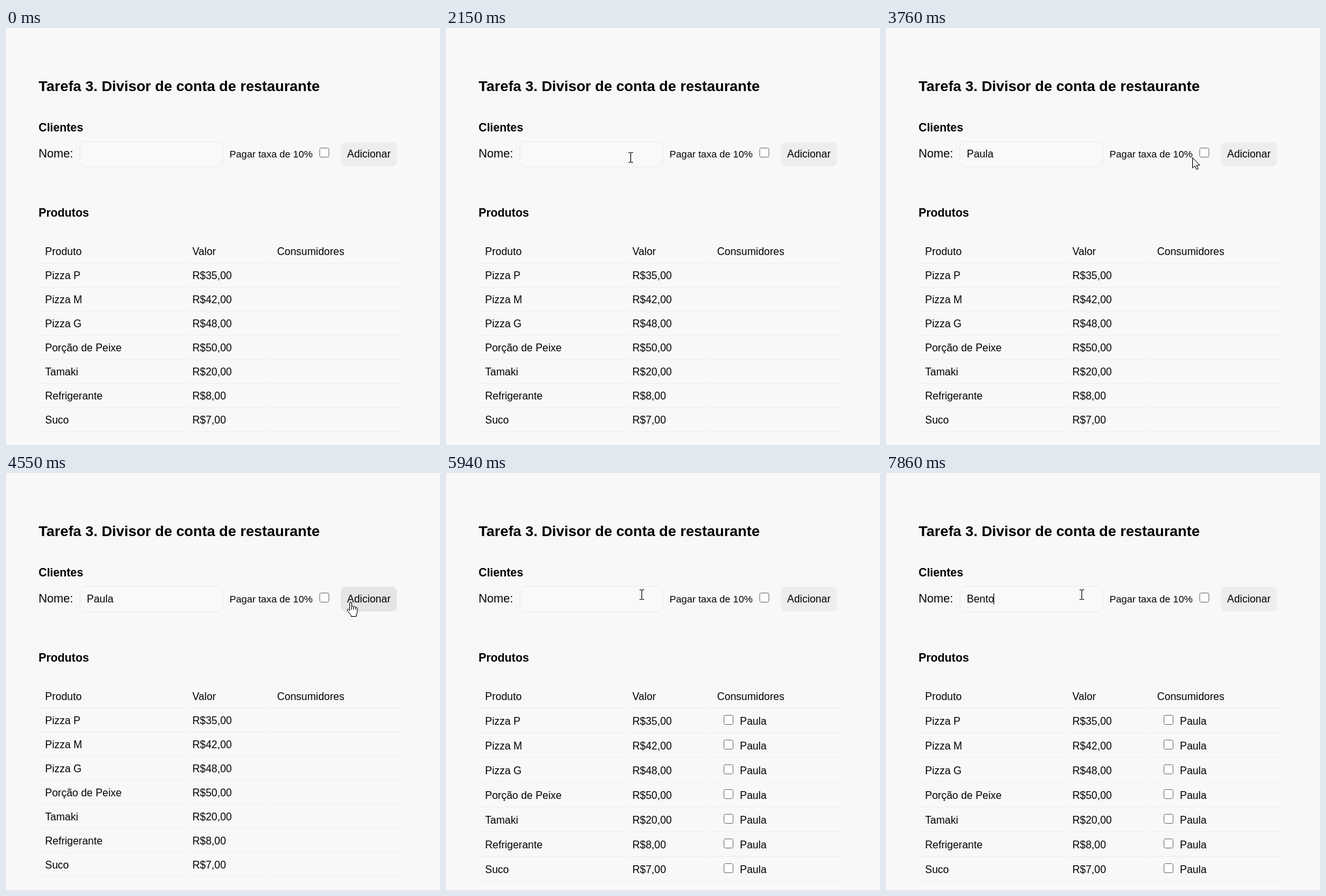
An HTML page that plays this animation: 666 by 641 pixels, repeating every 8 s.

```html
<!DOCTYPE html>
<html lang="pt-BR">
<head>
<meta charset="utf-8">
<title>Divisor de conta</title>
<style>
  html, body { margin: 0; width: 100%; height: 100%; overflow: hidden; background: #f8f8f8; }
  svg { display: block; width: 666px; height: 641px; }
  text { font: 16px "Liberation Sans", Arial, sans-serif; white-space: pre; }
  .title { font-size: 22.4px; font-weight: bold; }
  .head { font-size: 17.6px; font-weight: bold; }
  .name { font-size: 18px; }
  .fee { font-size: 15px; }
  .line { fill: #eee; }
  .field { fill: #f9f9f9; stroke: #eaeaea; }
  .box { fill: #fff; stroke: #767676; }
  .hover .box { stroke: #4f4f4f; }
  .tick { fill: none; stroke: #fff; stroke-width: 2; visibility: hidden; }
  .checked .box { fill: #0075ff; stroke: #0075ff; }
  .checked.hover .box { fill: #005cc8; stroke: #005cc8; }
  .checked .tick { visibility: visible; }
  #button { fill: #ededed; }
  #button.hover { fill: #e5e5e5; }
  .pointer { fill: #fff; stroke: #000; stroke-linejoin: round; }
  #beam { fill: none; stroke: #000; }
</style>
</head>
<body>
<svg viewBox="0 0 666 641">
  <defs>
    <g id="checkbox">
      <rect class="box" x=".5" y=".5" width="14" height="14" rx="2.2"/>
      <path class="tick" d="M3.2 7.6 6.2 10.6 12 4.2"/>
    </g>
  </defs>

  <text class="title" x="50" y="97">Tarefa 3. Divisor de conta de restaurante</text>
  <text class="head" x="50" y="159">Clientes</text>
  <text class="name" x="50" y="199">Nome:</text>
  <rect class="field" x="113.5" y="174.5" width="219" height="39" rx="7.5"/>
  <text id="typed" x="124" y="199"></text>
  <rect id="caret" width="1" height="17"/>
  <text class="fee" x="343" y="199">Pagar taxa de 10%</text>
  <g id="fee"><use href="#checkbox" x="481" y="184"/></g>
  <rect id="button" x="514" y="175" width="86" height="38" rx="8"/>
  <text x="523.5" y="199">Adicionar</text>

  <text class="head" x="50" y="290">Produtos</text>
  <g id="table"></g>

  <g id="cursor">
    <path id="arrow" class="pointer" d="M.5 .5V16.2L4.1 12.8 6.5 18.4 9 17.4 6.6 11.9H11.5Z"/>
    <path id="hand" class="pointer" d="M.5 13.5V2Q.5 .5 2 .5T3.5 2V7.5Q4 6.4 5.2 6.6T6.5 8Q7 7.1 8.2 7.4T9.5 9Q10 8.3 11 8.6T12.2 10.2V15Q12 18 10.5 20V22.5H2.5V20.5Q-.5 17.5-2.6 14.2-4 12-2.8 11.2-1.6 10.8 .5 13.5M3.5 7.5V12M6.5 8V12M9.5 9V12"/>
    <path id="beam" d="M-3-7.5H-1Q.5-7.5 .5-6V6Q.5 7.5-1 7.5H-3M4-7.5H2Q.5-7.5 .5-6V6Q.5 7.5 2 7.5H4"/>
  </g>
</svg>

<script>
const LOOP = 8000;
const ADDED = 4680;
const CLIENT = "Paula";
const $ = id => document.getElementById(id);

const products = [
  ["Pizza P", "35,00"], ["Pizza M", "42,00"], ["Pizza G", "48,00"],
  ["Porção de Peixe", "50,00"], ["Tamaki", "20,00"],
  ["Refrigerante", "8,00"], ["Suco", "7,00"]
];

const rule = (x, w) => `<rect class="line" x="${x}" y="12" width="${w}" height="1"/>`;
const rules = rule(52, 223) + rule(278, 128) + rule(408, 200);
const cell = (x, s) => `<text x="${x}">${s}</text>`;
const client = `<g class="client"><use href="#checkbox" x="426" y="-15"/>${cell(451, CLIENT)}</g>`;

$("table").innerHTML =
  `<g transform="translate(0 349)">${cell(60, "Produto")}${cell(286, "Valor")}${cell(416, "Consumidores")}${rules}</g>` +
  products.map(([name, price]) =>
    `<g class="row">${cell(60, name)}${cell(286, "R$" + price)}${client}${rules}</g>`).join("");
const rows = document.querySelectorAll(".row");
const clients = document.querySelectorAll(".client");

// time, text in the field, caret shown
const typing = [
  [0, "", false], [1720, "", true], [2150, "", false],
  ...[2550, 2690, 2830, 2960, 3100].map((t, i) => [t, CLIENT.slice(0, i + 1), true]),
  [3630, CLIENT, false], [ADDED, "", false],
  [5530, "", true], [5940, "", false], [6480, "", true],
  [6610, "B", true], [6750, "Be", true], [6890, "Ben", true], [7150, "Beno", true],
  [7420, "Ben", true], [7710, "Bent", true], [7860, "Bento", true]
];

// time, x, y of the pointer
const path = [
  [860, 595, 521], [1000, 560, 474], [1150, 470, 375], [1290, 360, 290],
  [1430, 296, 244], [1580, 284, 218], [1720, 283, 199],
  [3370, 305, 198], [3500, 380, 197], [3630, 444, 198], [3760, 470, 199],
  [3900, 483, 197], [4030, 487, 195], [4170, 488, 195], [4300, 509, 198],
  [4430, 521, 198], [4550, 527, 198],
  [4820, 505, 198], [4960, 430, 193], [5100, 355, 189], [5240, 308, 187], [5380, 300, 187]
];

const latest = (cues, t) => cues.findLast(c => c[0] <= t);
const show = (el, on) => { el.style.display = on ? "" : "none"; };
const inside = (x, y, left, right, top, bottom) =>
  x >= left && x < right && y >= top && y < bottom;

function draw(t) {
  const [, text, caretOn] = latest(typing, t);
  $("typed").textContent = text;
  const width = text ? $("typed").getComputedTextLength() : 0;
  $("caret").setAttribute("x", Math.floor(124 + width));
  $("caret").setAttribute("y", text ? 185 : 186);
  show($("caret"), caretOn);

  const added = t >= ADDED;
  const step = added ? 38 : 37;
  rows.forEach((row, i) =>
    row.setAttribute("transform", `translate(0 ${349 + step * (i + 1)})`));
  clients.forEach(c => show(c, added));

  const point = latest(path, t);
  const [, x, y] = point || [0, -50, -50];
  const overField = inside(x, y, 113, 333, 174, 214);
  const overFee = inside(x, y, 343, 500, 180, 205);
  const overButton = inside(x, y, 514, 600, 175, 213);
  show($("cursor"), !!point);
  $("cursor").setAttribute("transform", `translate(${x} ${y})`);
  show($("beam"), overField);
  show($("hand"), overButton);
  show($("arrow"), !overField && !overButton);
  $("button").classList.toggle("hover", overButton);
  $("fee").classList.toggle("hover", overFee);
  $("fee").classList.toggle("checked", t >= 4170 && !added);
}

let start;
function frame(now) {
  start ??= now;
  draw((now - start) % LOOP);
  requestAnimationFrame(frame);
}
draw(0);
requestAnimationFrame(frame);
</script>
</body>
</html>
```
